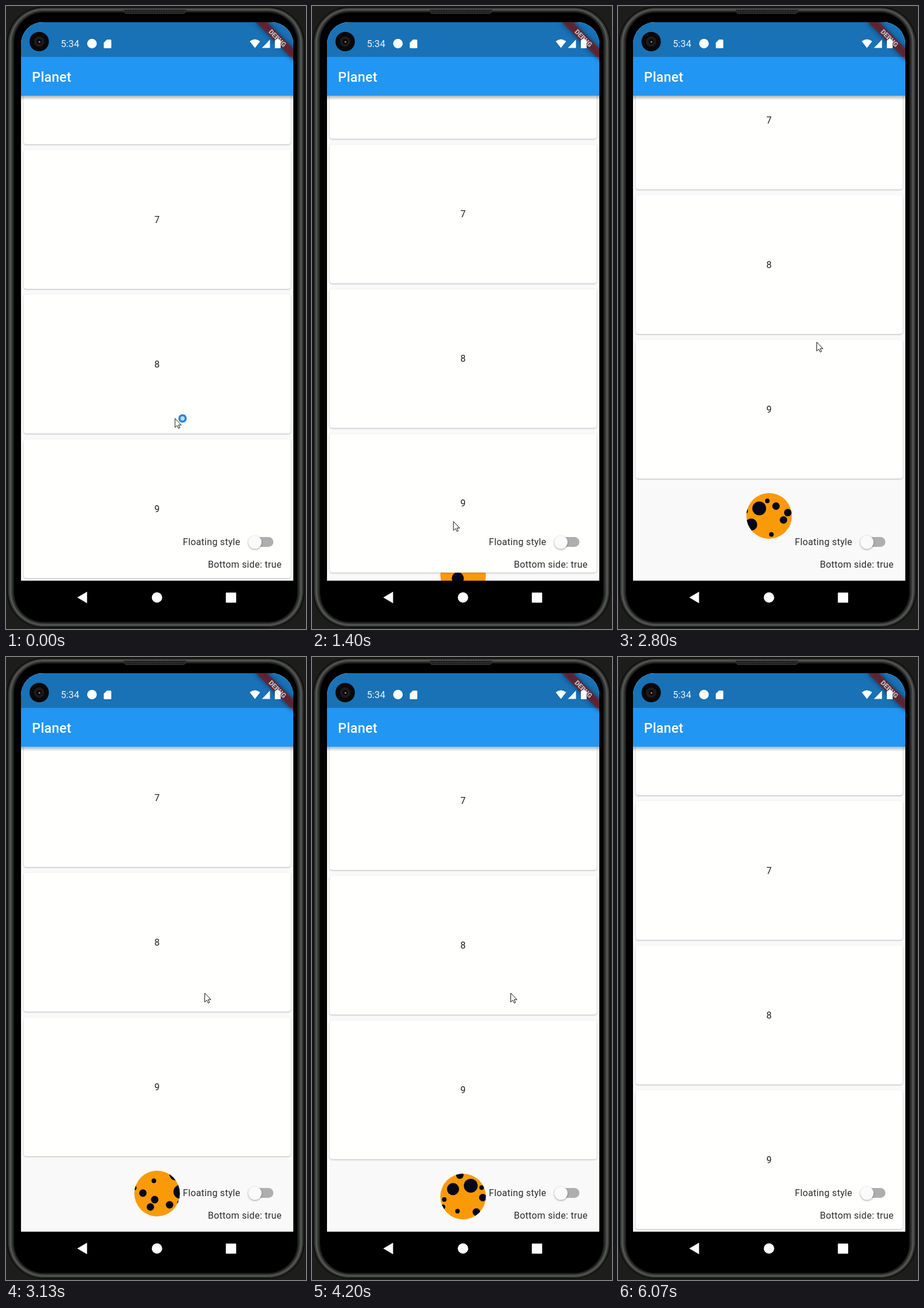
An HTML page that plays this animation: 520 by 1077 pixels, repeating every 6.54 s.

```html
<!DOCTYPE html>
<html lang="en">
<head>
<meta charset="utf-8">
<title>Planet footer</title>
<style>
  html, body { margin: 0; width: 100%; height: 100%; overflow: hidden; background: #1d1e1c; }
  svg { display: block; width: 100%; height: 100%; }
  text { font: 16.1px Roboto, sans-serif; fill: #1c1c1c; }
  .label { letter-spacing: .3px; fill: #2c2c2c; }
  .num { text-anchor: middle; }
  #title { font-size: 23.4px; font-weight: 500; letter-spacing: .2px; fill: #fff; }
  #clock { font-size: 16.6px; fill: #eef5fc; }
  #debug { font-size: 11.7px; font-weight: 900; fill: #fff; text-anchor: middle; }
  .card { fill: #fffffe; filter: drop-shadow(0 1px .8px #0004); }
</style>
</head>
<body>
<svg viewBox="0 0 520 1077">
  <defs>
    <clipPath id="screen"><rect x="26" y="28" width="472" height="1015" rx="38"/></clipPath>
    <clipPath id="disc"><circle r="39.5"/></clipPath>
    <linearGradient id="drop" x2="0" y2="1">
      <stop stop-color="#000" stop-opacity=".3"/>
      <stop offset="1" stop-color="#000" stop-opacity="0"/>
    </linearGradient>
    <pattern id="mesh" width="3" height="3" patternUnits="userSpaceOnUse">
      <rect width="3" height="3" fill="#161616"/><rect width="1.5" height="1.5" fill="#555"/>
    </pattern>
  </defs>

  <g id="body"></g>
  <path d="M203 6H313L309 13H207Z" fill="url(#mesh)" stroke="#444" stroke-width=".8"/>

  <g clip-path="url(#screen)">
    <rect x="26" y="28" width="472" height="966" fill="#f8f9f8"/>
    <g id="planet">
      <circle r="39.5" fill="#fb9a08"/>
      <g clip-path="url(#disc)"><g id="craters" fill="#040719"/></g>
    </g>
    <g id="cards"></g>

    <text class="label" x="306.5" y="932">Floating style</text>
    <text class="label" x="350" y="971">Bottom side: true</text>
    <rect x="425" y="918" width="38.5" height="17" rx="8.5" fill="#aeaeae"/>
    <circle cx="431.5" cy="927" r="11.5" fill="#fafafa" style="filter:drop-shadow(0 1.5px 1.5px #0006)"/>

    <rect x="26" y="155" width="472" height="8" fill="url(#drop)"/>
    <rect x="26" y="28" width="472" height="127" fill="#2196f3"/>
    <text id="title" x="45" y="131">Planet</text>

    <g transform="translate(498 28) rotate(45)">
      <rect x="-46" y="32" width="92" height="14" opacity=".5" style="filter:blur(4px)"/>
      <rect x="-46" y="32" width="92" height="14" fill="#b71c1c" opacity=".63"/>
      <text id="debug" y="43">DEBUG</text>
    </g>
    <rect x="26" y="28" width="472" height="60" opacity=".25"/>

    <text id="clock" x="95" y="71">5:34</text>
    <g fill="#fff">
      <circle cx="149" cy="65" r="8.3"/>
      <path d="M175 58h6q1.5 0 1.5 1.5v12q0 1.5-1.5 1.5h-10q-1.5 0-1.5-1.5v-8z"/>
      <path d="M431.5 72.5L422.5 61Q431.5 54 440.5 61Z"/>
      <path d="M451 65L457.5 58V72.500H443.500Z"/>
      <path d="M469 57h4v2h3v14h-10v-14h3z"/>
    </g>

    <rect x="26" y="993.5" width="472" height="60"/>
  </g>

  <circle cx="57.5" cy="61.5" r="16.8" fill="#090909"/>
  <circle cx="57.5" cy="61.5" r="9" fill="#1d1b1b"/>
  <circle cx="57.5" cy="61.5" r="4.5" fill="#0b0808"/>
  <circle cx="58" cy="62" r="1.6" fill="#888"/>

  <g fill="#fff">
    <path d="M123.5 1022.5L140.5 1012.5V1032.5Z"/>
    <circle cx="261.7" cy="1022.5" r="9"/>
    <rect x="381" y="1014" width="18" height="17.5" rx="1"/>
  </g>

  <g id="cursor">
    <path d="M0 0V15.5L3.600 12.2L6 17.3L8.300 16.2L6 11.3H10.7Z" fill="#fff" stroke="#111"/>
    <circle id="busy" cx="13" r="5.5" fill="#b9dcf7" stroke="#2583dc" stroke-width="3.5"/>
  </g>
</svg>

<script>
const LOOP = 6540, STEP = 200 / 3;
const GRAB = 1370, RELEASE = 2800, STOP = 4730, CLOSE = 5600, CLOSED = 6070;
const PEAK = 172, REST = 120.8;
const DIR = [-.914, .406];           // drift of the planet's surface
const $ = id => document.getElementById(id);
const part = (t, a, b) => Math.min(1, Math.max(0, (t - a) / (b - a)));
const mix = (a, b, u) => a + (b - a) * u;
const smooth = u => u * u * (3 - 2 * u);
const out = (u, n) => 1 - (1 - u) ** n;
const move = (id, x, y) => $(id).setAttribute('transform', `translate(${x} ${y})`);
const show = (id, on) => $(id).style.display = on ? '' : 'none';

function add(parent, tag, attrs, text = '') {
  const el = document.createElementNS('http://www.w3.org/2000/svg', tag);
  for (const k in attrs) el.setAttribute(k, attrs[k]);
  el.textContent = text;
  $(parent).append(el);
}

// phone body: nested rims from the outer edge inwards
['#0f100f', '#343633', '#565955', '#3a3c39', '#1f201e', '#000'].forEach((fill, i) => {
  const d = 1 + i * 2.6;
  add('body', 'rect', { x: d, y: d * .8, width: 519 - 2 * d, height: 1076 - d * 1.6, rx: 65 - d, fill });
});

for (let n = 6; n < 10; n++) {
  const y = 249 + (n - 7) * 250;
  add('cards', 'rect', { class: 'card', x: 30.5, y, width: 463, height: 240, rx: 4.5 });
  add('cards', 'text', { class: 'num', x: 261.7, y: y + 126 }, n);
}

// one cluster of craters, repeated along the drift and turned each time
const cluster = [[-8, -17, 12], [-22, 11, 10.5], [6, -30, 4], [21, -21, 6.5],
  [-34, -13, 6.5], [13, 28, 4], [34, 3, 6.5], [-17, 34, 4]];
for (let k = 0; k < 5; k++) {
  const at = 15.4 + k * 75, c = Math.cos(k * 2.4), s = Math.sin(k * 2.4);
  for (const [x, y, r] of cluster)
    add('craters', 'circle', { cx: x * c - y * s - DIR[0] * at, cy: x * s + y * c - DIR[1] * at, r });
}

function pointer(t) {
  const path = (x0, y0, x1, y1, u) => [mix(x0, x1, u), mix(y0, y1, u)];
  if (t < GRAB) return path(293, 713, 243, 901, smooth(part(t, 0, 900)));
  if (t < 1800) return path(243, 901, 274, 759, part(t, GRAB, 1800));
  return path(274, 759, 344.5, 581, out(part(t, 1800, 2670), 2));
}

// overscroll: resisted drag, settle to rest, close
function pull(t) {
  if (t < GRAB) return 0;
  if (t < RELEASE) return 230.3 * (1 - Math.exp((pointer(t)[1] - 901) / 233));
  if (t < CLOSE) return mix(PEAK, REST, out(part(t, RELEASE, RELEASE + 500), 3));
  return REST * (1 - smooth(part(t, CLOSE - STEP, CLOSED)));
}

function draw(t) {
  const s = pull(t);
  const drift = t < RELEASE ? .147 * s : 25.3 + .15 * (Math.min(t, STOP) - RELEASE);
  const below = t < RELEASE ? Math.min(s / 2, 64.5) : 64.5 * Math.min(1, s / REST);
  move('cards', 0, -s);
  move('planet', 261.9, 989 - s + below);
  move('craters', DIR[0] * drift, DIR[1] * drift);
  move('cursor', ...pointer(t));
  show('planet', s > 1);
  show('cursor', t < CLOSE - 5);
  show('busy', t < 600);
}

function frame(now) {
  draw(Math.floor(now % LOOP / STEP + .01) * STEP);
  requestAnimationFrame(frame);
}
frame(0);
</script>
</body>
</html>
```
